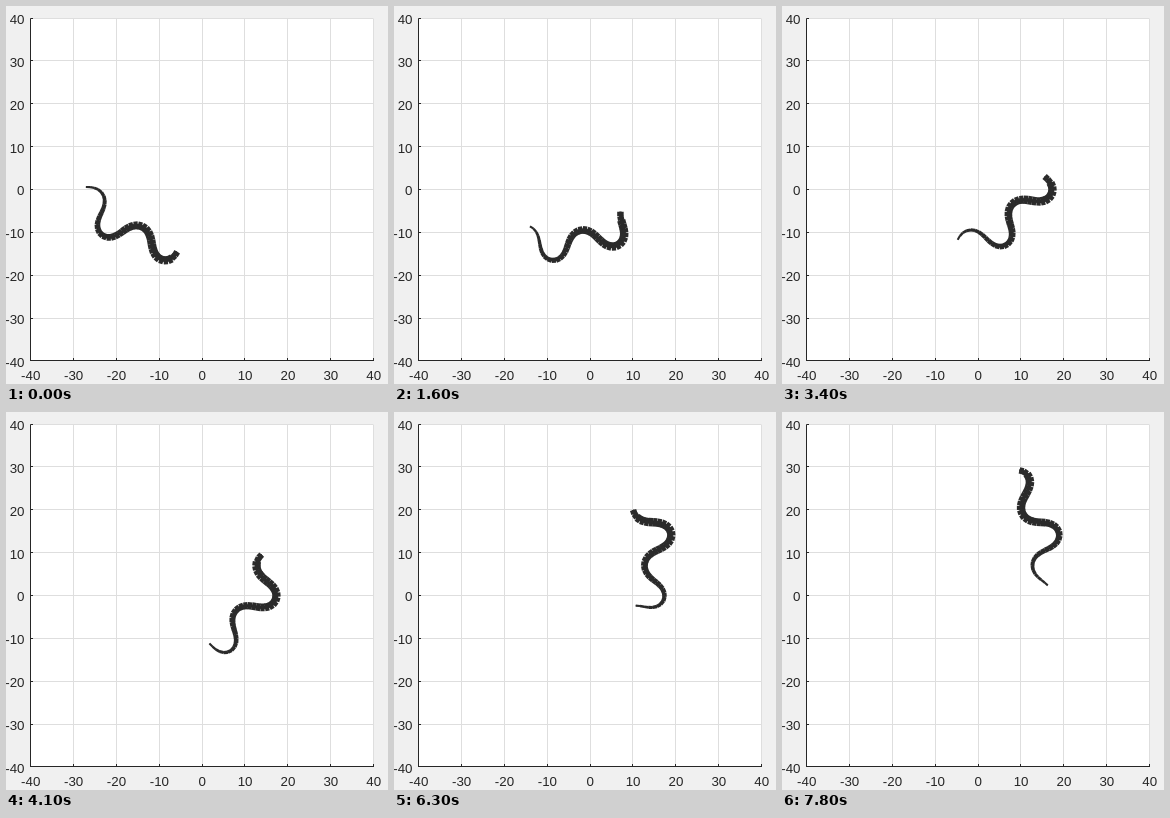
Write an HTML page that moves like this. It is 382 px wide and 378 px high and loops after 8 s.

```html
<!DOCTYPE html>
<html lang="en">
<head>
<meta charset="utf-8">
<title>Snake motion plot</title>
<style>
  html, body { margin: 0; width: 100%; height: 100%; overflow: hidden; background: #f0f0f0; }
  svg { display: block; width: 100%; height: 100%; }
  text { font: 13.33px "Liberation Sans", Arial, sans-serif; fill: #262626; }
</style>
</head>
<body>
<svg viewBox="0 0 382 378">
  <rect x="24" y="12" width="344" height="343" fill="#fff"/>
  <g id="grid" stroke="#dedede"></g>
  <g id="axes" stroke="#262626"></g>
  <g id="labels"></g>
  <g id="snake" stroke="#2b2b2b" fill="none"></g>
</svg>
<script>
const $ = id => document.getElementById(id);

function add(parent, tag, attrs, text) {
  const el = document.createElementNS("http://www.w3.org/2000/svg", tag);
  for (const k in attrs) el.setAttribute(k, attrs[k]);
  if (text !== undefined) el.textContent = text;
  parent.appendChild(el);
  return el;
}
const line = (parent, x1, y1, x2, y2) => add(parent, "line", { x1, y1, x2, y2 });
const snap = v => Math.floor(v) + 0.5;

// Axes: eight steps of ten units each way
const LEFT = 24.5, RIGHT = 367.5, TOP = 12.1, BOTTOM = 354.9, TICK_LENGTH = 2.5;
const left = snap(LEFT), right = snap(RIGHT), top_ = snap(TOP), bottom = snap(BOTTOM);
for (let i = 0; i <= 8; i++) {
  const x = LEFT + i * (RIGHT - LEFT) / 8, gx = snap(x);
  const y = BOTTOM - i * (BOTTOM - TOP) / 8, gy = snap(y);
  const value = i * 10 - 40;
  line($("grid"), gx, top_, gx, bottom);
  line($("grid"), left, gy, right, gy);
  line($("axes"), gx, bottom, gx, bottom - TICK_LENGTH);
  line($("axes"), left, gy, left + TICK_LENGTH, gy);
  add($("labels"), "text", { x: x + 0.2, y: 374, "text-anchor": "middle" }, value);
  add($("labels"), "text", { x: 18.5, y: Math.round(y + 5.95), "text-anchor": "end" }, value);
}
line($("axes"), left, top_, left, bottom + 0.5);
line($("axes"), left - 0.5, bottom, right + 0.5, bottom);

// The trail: heading swings as a cosine around a slowly turning course.
// Each link is one axis unit long.
const LINKS = 39, TRAVEL = 80, UNIT = (RIGHT - LEFT) / 80;
const CREST = 60.8, PERIOD = 20.5;
const ANCHOR = { node: 61, x: 228.4, y: 218.4 };

function heading(n) {
  const d = n - CREST;
  return 0.69 + 0.03 * d + 1.17 * Math.cos(2 * Math.PI * d / PERIOD);
}

const nodes = [{ x: 0, y: 0 }];
for (let n = 0; n < LINKS + TRAVEL; n++) {
  const a = heading(n + 0.5);
  nodes.push({ x: nodes[n].x + UNIT * Math.cos(a), y: nodes[n].y - UNIT * Math.sin(a) });
}
const { x: ax, y: ay } = nodes[ANCHOR.node];
for (const p of nodes) {
  p.x += ANCHOR.x - ax;
  p.y += ANCHOR.y - ay;
}

// Body links, thin at the tail and narrower at the head; a core joins them
const widthAt = i => i >= LINKS - 2 ? 6.5 : 2.1 + 6.4 * Math.sin(0.62 * Math.PI * i / LINKS);
const stroke = width => add($("snake"), "path", { "stroke-width": width.toFixed(2), "stroke-linejoin": "round" });
const body = Array.from({ length: LINKS }, (_, i) => ({
  link: stroke(widthAt(i)),
  core: stroke(widthAt(i) * 0.35)
}));

// Links travelled at a few ticks of 100 ms; the snake slows down
const TICK = 100, TICKS = 80;
const pace = [[0, 0], [16, 25], [17, 25], [41, 50], [54, 61], [63, 69], [78, TRAVEL], [TICKS, TRAVEL]];

function travelled(ms) {
  const tick = Math.floor(ms / TICK) % TICKS;
  const k = pace.findIndex(([t]) => t > tick);
  const [t0, n0] = pace[k - 1], [t1, n1] = pace[k];
  return Math.floor(n0 + (n1 - n0) * (tick - t0) / (t1 - t0));
}

const pathOf = pts => "M" + pts.map(p => `${p.x.toFixed(2)} ${p.y.toFixed(2)}`).join("L");

function draw(ms) {
  const tail = travelled(ms), head = tail + LINKS;
  body.forEach(({ link, core }, i) => {
    const n = tail + i;
    link.setAttribute("d", pathOf(nodes.slice(n, n + 2)));
    core.setAttribute("d", pathOf(nodes.slice(n, Math.min(n + 3, head + 1))));
  });
}

const start = performance.now();
function loop() {
  draw(Math.max(0, performance.now() - start));
  requestAnimationFrame(loop);
}
loop();
</script>
</body>
</html>
```
